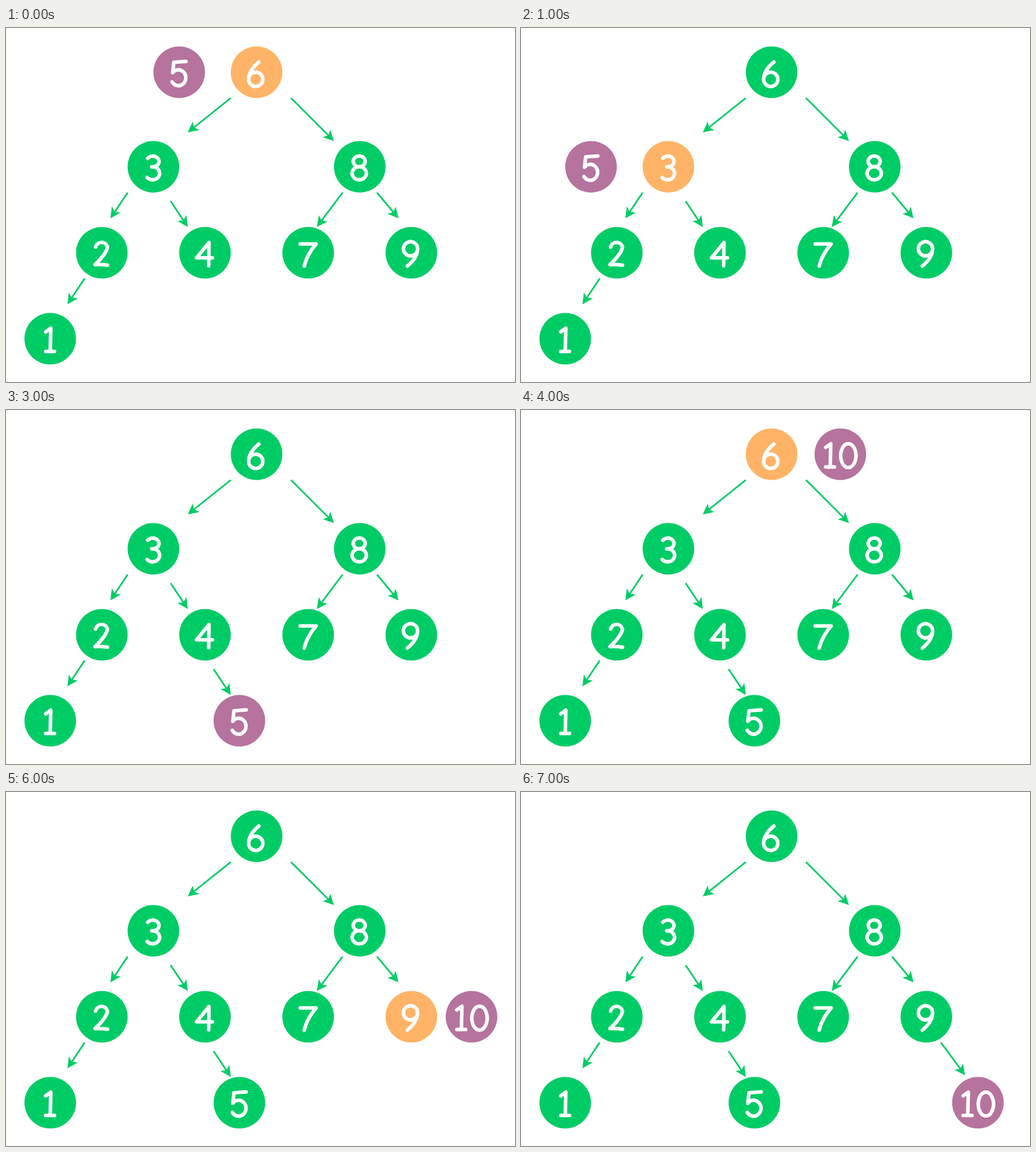
An HTML page for the animation above (8 s loop, 897x624 px).

```html
<!DOCTYPE html>
<html lang="en">
<head>
<meta charset="utf-8">
<title>Binary search tree insertion</title>
<style>
  html, body { margin: 0; width: 100%; height: 100%; overflow: hidden; background: #fff; }
  svg { display: block; }
  .digit { fill: none; stroke: #fff; stroke-width: 6.3; stroke-linecap: round; stroke-linejoin: round; }
</style>
</head>
<body>
<svg id="stage" width="897" height="624" viewBox="0 0 897 624"></svg>
<script>
const GREEN = '#00cc66', ORANGE = '#ffb366', PURPLE = '#b5739d';
const STEP_MS = 1000;
const GRID = 1000 / 66, ORIGIN = 2.2;
const DIGIT_PITCH = 32;
const stage = document.getElementById('stage');

// Handwritten numerals as pen strokes around the centre of a circle.
const PEN = {
  0: 'M0 -18.5A13.5 21 0 1 1 -.1 -18.5Z',
  1: 'M-8 -12L1 -18.5L0 22M-8 22.5H7.5',
  2: 'M-11 -10A10.8 10.8 0 0 1 10 -10Q8 2 -12 21Q-2 20 10 22',
  3: 'M-10 -15A11 9.5 0 1 1 -3 0A12.5 11.5 0 1 1 -11 19',
  4: 'M6.5 23L7 -18L-15 9H13',
  5: 'M12 -19L-9.5 -17.5L-11.5 1A13 14 0 1 1 -12.5 17',
  6: 'M4 -18Q-14 -3 -14 12.5A12.5 12.5 0 1 0 -13.5 9',
  7: 'M-14 -15.5H14Q-2 3 -7 23.5',
  8: 'M-1 0A10.5 9.5 0 1 1 -.9 0A12.5 11.5 0 1 1 -1 0Z'
};

const toPixels = cells => cells.map(cell => ORIGIN + GRID * cell);
const shift = ([x, y], [dx, dy]) => [x + dx, y + dy];

function add(parent, tag, attrs) {
  const el = document.createElementNS('http://www.w3.org/2000/svg', tag);
  for (const key in attrs) el.setAttribute(key, attrs[key]);
  return parent.appendChild(el);
}

function addArrow(from, to) {
  const [x1, y1] = toPixels(from), [x2, y2] = toPixels(to);
  const length = Math.hypot(x2 - x1, y2 - y1);
  const angle = Math.atan2(y2 - y1, x2 - x1) * 180 / Math.PI;
  const group = add(stage, 'g', { transform: `translate(${x2} ${y2}) rotate(${angle})` });
  add(group, 'path', { d: `M${-length} 0H-13`, stroke: GREEN, 'stroke-width': 3 });
  add(group, 'path', { d: 'M0 0L-18.8 9.5L-14 0L-18.8 -9.5Z', fill: GREEN });
  return group;
}

function addDigit(group, digit, x) {
  const upsideDown = digit === '9';
  const turn = upsideDown ? ' rotate(180 -1.5 2.75)' : '';
  add(group, 'path', { d: PEN[upsideDown ? 6 : digit], class: 'digit', transform: `translate(${x} 0)${turn}` });
}

const nodes = {};

function addNode(value, cell, parent, arrow) {
  const group = add(stage, 'g', { role: 'img', 'aria-label': value });
  const circle = add(group, 'circle', { r: 3 * GRID });
  const digits = [...String(value)];
  digits.forEach((digit, i) => addDigit(group, digit, (i - (digits.length - 1) * 0.56) * DIGIT_PITCH));
  nodes[value] = { value, cell, parent, arrow, group, circle };
}

// Offsets in grid cells: the child from its parent, the arrow's ends from parent and child.
function branch(parent, value, offset, tail, tip) {
  const origin = nodes[parent].cell, cell = shift(origin, offset);
  addNode(value, cell, parent, addArrow(shift(origin, tail), shift(cell, tip)));
}

addNode(6, [29, 5]);
branch(6, 3, [-12, 11], [-3, 3], [4, -4]);
branch(6, 8, [12, 11], [4, 3], [-3, -3]);
branch(3, 2, [-6, 10], [-3, 3], [1, -4]);
branch(3, 4, [6, 10], [2, 4], [-2, -3]);
branch(8, 7, [-6, 10], [-2, 3], [1, -3]);
branch(8, 9, [6, 10], [2, 3], [-1.5, -4]);
branch(2, 1, [-6, 10], [-2, 3], [2, -4]);
branch(4, 5, [4, 10], [1, 4], [-1, -3]);
branch(9, 10, [6, 10], [1.7, 3], [-1.5, -3.2]);

// One step beside each ancestor from the root down, then one in the final place.
function insertion(value, besides) {
  const path = [];
  for (let at = nodes[value].parent; at; at = nodes[at].parent) path.unshift(at);
  const visits = path.map((compare, i) => ({ value, compare, cell: shift(nodes[compare].cell, besides[i]) }));
  return [...visits, { value, cell: nodes[value].cell }];
}

const steps = [
  ...insertion(5, [[-9, 0], [-9, 0], [4, -5]]),
  ...insertion(10, [[8, 0], [8, 0], [7, 0]])
];
const placedAt = value => steps.findIndex(step => step.value === value && !step.compare);
const firstSeen = value => steps.findIndex(step => step.value === value);

const show = (el, visible) => el.setAttribute('visibility', visible ? 'visible' : 'hidden');

function render(index) {
  const { value: active, compare, cell } = steps[index];
  for (const node of Object.values(nodes)) {
    const isActive = node.value === active;
    const [x, y] = toPixels(isActive ? cell : node.cell);
    node.group.setAttribute('transform', `translate(${x} ${y})`);
    node.circle.setAttribute('fill', isActive ? PURPLE : node.value === compare ? ORANGE : GREEN);
    show(node.group, index >= firstSeen(node.value));
    if (node.arrow) show(node.arrow, index >= placedAt(node.value));
  }
}

const start = performance.now();
let current = 0;
function tick() {
  const index = Math.floor((performance.now() - start) / STEP_MS) % steps.length;
  if (index !== current) render(current = index);
  requestAnimationFrame(tick);
}
render(current);
requestAnimationFrame(tick);
</script>
</body>
</html>
```
